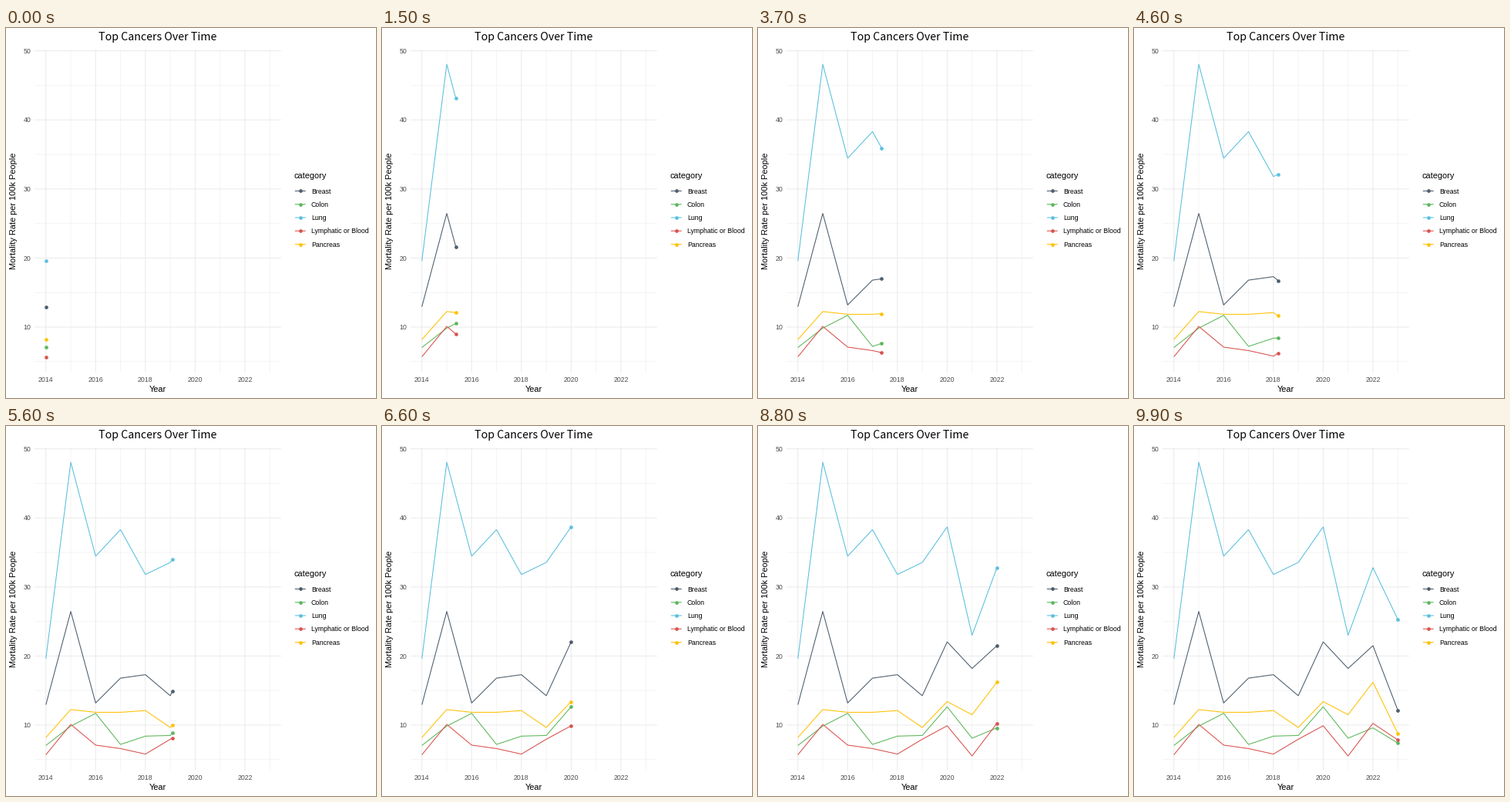
These frames come from a looping animation (480x480 px, 10 s). A matplotlib script:

```python
import numpy as np
import matplotlib.pyplot as plt
from matplotlib.animation import FuncAnimation

SIZE, DPI = 480, 72            # at 72 dpi one point is one pixel
STEPS = 11                     # frames per year
YEARS = np.arange(2014, 2024)
FRAMES = STEPS * (len(YEARS) - 1) + 1

LEFT, RIGHT, TOP, BOTTOM = 37.2, 356.9, 27.8, 446.8
SERIES = {
    "Breast": ("#4E5D6C", [12.95, 26.45, 13.2, 16.8, 17.3, 14.25, 22.05, 18.2, 21.5, 12.15]),
    "Colon": ("#5CB85C", [7.05, 9.85, 11.7, 7.2, 8.4, 8.5, 12.65, 8.1, 9.6, 7.4]),
    "Lung": ("#5BC0DE", [19.6, 48.05, 34.45, 38.3, 31.8, 33.55, 38.7, 23.0, 32.8, 25.3]),
    "Lymphatic or Blood": ("#D9534F", [5.7, 10.1, 7.1, 6.6, 5.8, 7.95, 9.9, 5.53, 10.25, 7.85]),
    "Pancreas": ("#FFC107", [8.2, 12.25, 11.85, 11.85, 12.1, 9.65, 13.4, 11.5, 16.2, 8.8]),
}

plt.rcParams["font.family"] = "Liberation Sans"


def px(year):
    return 51.73 + 32.28 * (np.asarray(year) - 2014)


def py(rate):
    return 388.0 - 8.96 * (np.asarray(rate) - 10)


fig = plt.figure(figsize=(SIZE / DPI, SIZE / DPI), dpi=DPI, facecolor="white")
ax = fig.add_axes([0, 0, 1, 1])
ax.set(xlim=(0, SIZE), ylim=(SIZE, 0))
ax.axis("off")


def stroke(xs, ys, color, width=1.07, z=2):
    return ax.plot(xs, ys, color=color, lw=width, zorder=z, snap=False,
                   solid_capstyle="butt", solid_joinstyle="round")[0]


def dot(x, y, color):
    return ax.plot([x], [y], "o", color=color, ms=4.7, mew=0, zorder=3, snap=False)[0]


def label(x, y, text, size=8.8, color="black", ha="center", **kw):
    ax.text(x, y, text, fontsize=size, color=color, ha=ha, va="baseline", **kw)


# Grid and axis labels
for year in YEARS:
    major = year % 2 == 0
    stroke([px(year)] * 2, [TOP, BOTTOM], "#EBEBEB", 1.07 if major else 0.53, 1)
    if major:
        label(px(year), 459.2, str(year), color="#4D4D4D")
for rate in range(5, 51, 5):
    major = rate % 10 == 0
    stroke([LEFT, RIGHT], [py(rate)] * 2, "#EBEBEB", 1.07 if major else 0.53, 1)
    if major:
        label(32.2, py(rate) + 3.1, str(rate), color="#4D4D4D", ha="right")

label(197, 16, "Top Cancers Over Time", 14.2, family="Noto Sans CJK JP")
label(197, 472, "Year", 11)
ax.text(13.2, 237.3, "Mortality Rate per 100k People", fontsize=11, rotation=90,
        rotation_mode="anchor", ha="center", va="baseline")

# Legend
label(373, 195, "category", 11, ha="left")
for i, (name, (color, _)) in enumerate(SERIES.items()):
    y = 211.4 + 17.28 * i
    stroke([374.8, 388.7], [y, y], color)
    dot(381.8, y, color)
    label(396, y + 3.2, name, ha="left")

lines = [stroke([], [], color) for color, _ in SERIES.values()]
dots = [dot(0, 0, color) for color, _ in SERIES.values()]


def draw(frame):
    now = YEARS[0] + frame / STEPS
    past = YEARS[:frame // STEPS + 1]
    for line, head, (_, rates) in zip(lines, dots, SERIES.values()):
        rate = np.interp(now, YEARS, rates)
        line.set_data(px(np.append(past, now)), py(np.append(rates[:len(past)], rate)))
        head.set_data([px(now)], [py(rate)])
    return lines + dots


anim = FuncAnimation(fig, draw, frames=FRAMES, interval=100, repeat=True,
                     repeat_delay=0, blit=False)
plt.show()
```
